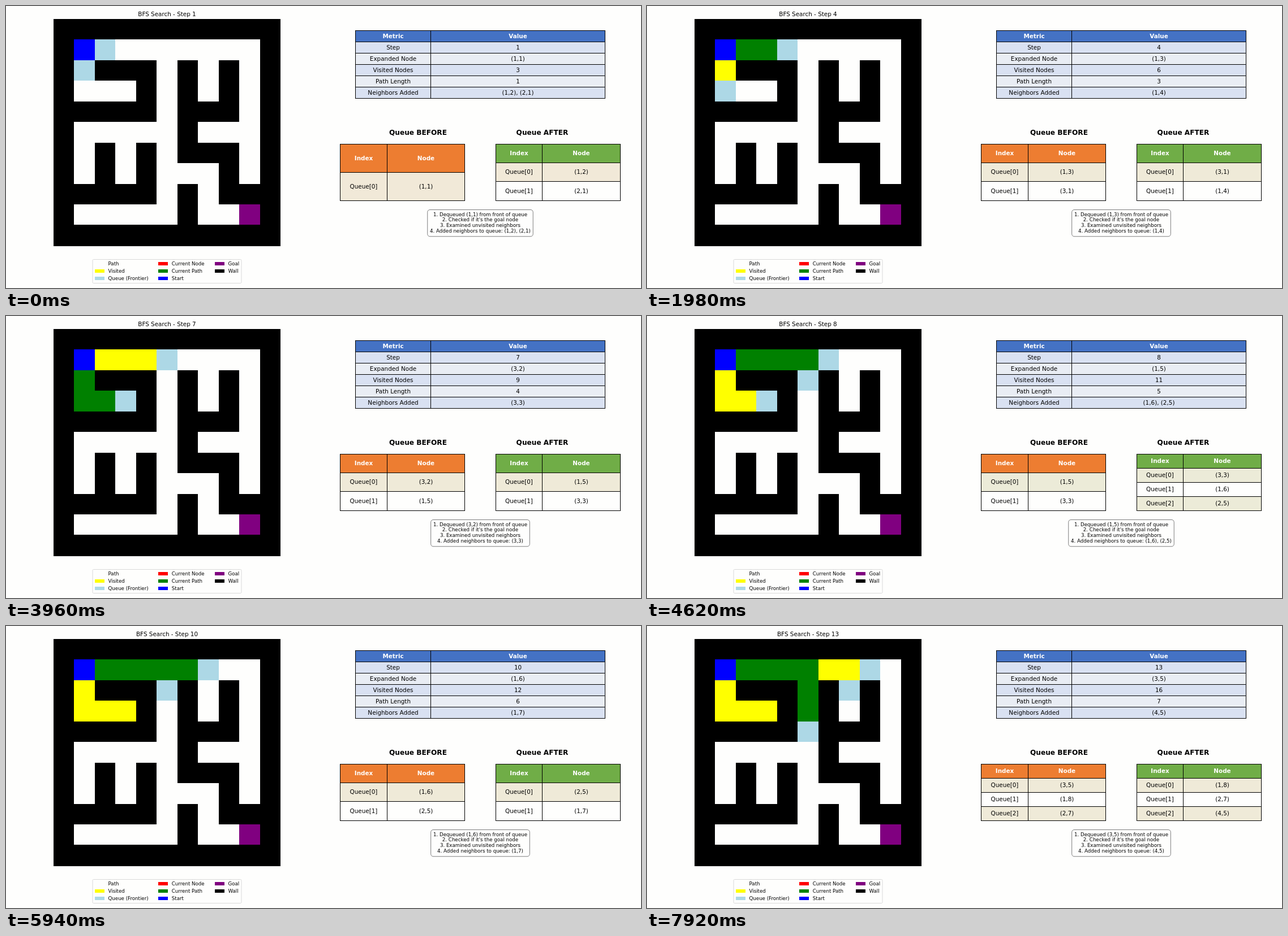
An HTML page with a canvas for the animation above (8000 ms loop, 1122 px wide and 499 px high).

```html
<!DOCTYPE html>
<html lang="en">
<head>
<meta charset="utf-8">
<title>BFS Search</title>
<style>
html, body { margin: 0; width: 100%; height: 100%; overflow: hidden; background: #fefefd; }
canvas { display: block; }
</style>
</head>
<body>
<canvas id="stage" width="1122" height="499"></canvas>
<script>
const ctx = document.getElementById('stage').getContext('2d');
const LOOP = 8000, STEP_MS = 660, STEPS = 13;
const PAPER = '#fefefd', INK = '#000';
const PT = 62.4 / 72;

const MAZE = [
  '###########',
  '#.........#',
  '#.###.#.#.#',
  '#...#.#.#.#',
  '#####.###.#',
  '#.....#...#',
  '#.#.#.###.#',
  '#.#.#...#.#',
  '#####.#.###',
  '#.....#...#',
  '###########'
];
const START = [1, 1], GOAL = [9, 9];
const MOVES = [[0, 1], [1, 0], [0, -1], [-1, 0]];

const label = ([r, c]) => `(${r},${c})`;

// Breadth-first search, recording the state after each expansion
function search() {
  const parent = new Map([[label(START), null]]);
  const done = [], steps = [];
  let queue = [START];
  while (steps.length < STEPS) {
    const before = queue;
    const node = before[0];
    const added = MOVES
      .map(([dr, dc]) => [node[0] + dr, node[1] + dc])
      .filter(n => MAZE[n[0]][n[1]] === '.' && !parent.has(label(n)));
    added.forEach(n => parent.set(label(n), node));
    queue = before.slice(1).concat(added);
    done.push(node);
    const path = [];
    for (let n = node; n; n = parent.get(label(n))) path.push(n);
    steps.push({ node, before, after: queue, path, done: done.slice(),
      seen: parent.size, added: added.map(label).join(', ') || 'None' });
  }
  return steps;
}
const steps = search();

function box(x0, y0, x1, y1, color) {
  ctx.fillStyle = color;
  ctx.fillRect(x0, y0, x1 - x0, y1 - y0);
}

function text(str, x, y, pt, { bold = false, color = INK, align = 'center' } = {}) {
  ctx.font = `${bold ? 'bold ' : ''}${pt * PT}px "DejaVu Sans", sans-serif`;
  ctx.textAlign = align;
  ctx.fillStyle = color;
  ctx.fillText(str, x, y);
}

function frame(x0, y0, x1, y1, r, color) {
  ctx.beginPath();
  ctx.roundRect(x0, y0, x1 - x0, y1 - y0, r);
  ctx.lineWidth = 0.9;
  ctx.strokeStyle = color;
  ctx.stroke();
}

const cellX = c => Math.floor(84.5 + 36.45 * c);
const cellY = r => Math.floor(23.4 + 36.45 * r);
function cell([r, c], color) {
  box(cellX(c), cellY(r), cellX(c + 1), cellY(r + 1), color);
}

function drawMaze(s) {
  box(84, 23, 485, 425, INK);
  MAZE.forEach((row, r) => [...row].forEach((ch, c) => {
    if (ch === '.') cell([r, c], PAPER);
  }));
  s.done.forEach(n => cell(n, '#ffff00'));
  s.after.forEach(n => cell(n, '#add8e6'));
  s.path.forEach(n => cell(n, '#008000'));
  cell(START, '#0000ff');
  cell(GOAL, '#800080');
}

// xs: column lines; rows[0] is the header; fills alternate over the body rows
function table(xs, top, height, rows, head, fills) {
  const lineY = k => Math.floor(top + height * k / rows.length);
  const last = xs.length - 1;
  rows.forEach((row, k) => {
    const y0 = lineY(k), y1 = lineY(k + 1);
    box(xs[0], y0, xs[last], y1, k ? fills[(k - 1) % 2] : head);
    row.forEach((str, i) => text(str, (xs[i] + xs[i + 1] + 1) / 2,
      Math.round((y0 + y1 + 1) / 2 + 3.2), 12, k ? {} : { bold: true, color: '#fff' }));
  });
  for (let k = 0; k <= rows.length; k++) box(xs[0], lineY(k), xs[last] + 1, lineY(k) + 1, INK);
  xs.forEach(x => box(x, top, x + 1, top + height + 1, INK));
}

// The stripe tint leans to the table with more striped area
function stripeTint(s) {
  const area = q => Math.ceil(q.length / 2) / (q.length + 1);
  const a = area(s.before), b = area(s.after), w = a / (a + b);
  const warm = [251, 229, 214], cool = [226, 239, 218];
  return `rgb(${warm.map((v, i) => Math.round(v * w + cool[i] * (1 - w))).join(',')})`;
}

function queueTable(xs, queue, head, tint) {
  const rows = queue.map((n, i) => [`Queue[${i}]`, label(n)]);
  table(xs, 244, 100, [['Index', 'Node'], ...rows], head, [tint, PAPER]);
}

function drawNotes(s) {
  const lines = [
    `1. Dequeued ${label(s.node)} from front of queue`,
    "2. Checked if it's the goal node",
    '3. Examined unvisited neighbors',
    `4. Added neighbors to queue: ${s.added}`
  ];
  let width = 0;
  lines.forEach((str, i) => {
    text(str, 838, 372 + 10 * i - (i ? 1 : 0), 10);
    width = Math.max(width, ctx.measureText(str).width);
  });
  const half = width / 2 + 4.3;
  frame(838 - half, 360.5, 838 + half, 407.8, 4.3, '#707070');
}

const LEGEND = [
  [156.5, ['Path', PAPER], ['Visited', '#ffff00'], ['Queue (Frontier)', '#add8e6']],
  [268.8, ['Current Node', '#ff0000'], ['Current Path', '#008000'], ['Start', '#0000ff']],
  [368.5, ['Goal', '#800080'], ['Wall', INK]]
];
function drawLegend() {
  frame(153, 448.5, 416, 490.5, 1.7, '#d6d6d6');
  LEGEND.forEach(([x, ...items]) => items.forEach(([name, color], i) => {
    const y = 459 + 13 * i;
    box(Math.round(x), y - 6, Math.round(x + 17.3), y, color);
    text(name, x + 24, y, 10, { align: 'left' });
  }));
}

function draw(t) {
  const i = Math.min(STEPS - 1, Math.floor(t / STEP_MS));
  const s = steps[i];
  box(0, 0, 1122, 499, PAPER);
  text(`BFS Search - Step ${i + 1}`, 284.5, 18, 12);
  drawMaze(s);
  drawLegend();
  table([617, 750, 1058], 43, 120, [
    ['Metric', 'Value'],
    ['Step', i + 1],
    ['Expanded Node', label(s.node)],
    ['Visited Nodes', s.seen],
    ['Path Length', s.path.length],
    ['Neighbors Added', s.added]
  ], '#4472c4', ['#d9e1f2', '#e9edf4']);
  text('Queue BEFORE', 728, 228, 14, { bold: true });
  text('Queue AFTER', 947.5, 228, 14, { bold: true });
  const tint = stripeTint(s);
  queueTable([590, 673, 810], s.before, '#ed7d31', tint);
  queueTable([865, 947, 1085], s.after, '#70ad47', tint);
  drawNotes(s);
}

const begin = performance.now();
function tick() {
  draw((performance.now() - begin) % LOOP);
  requestAnimationFrame(tick);
}
tick();
</script>
</body>
</html>
```
